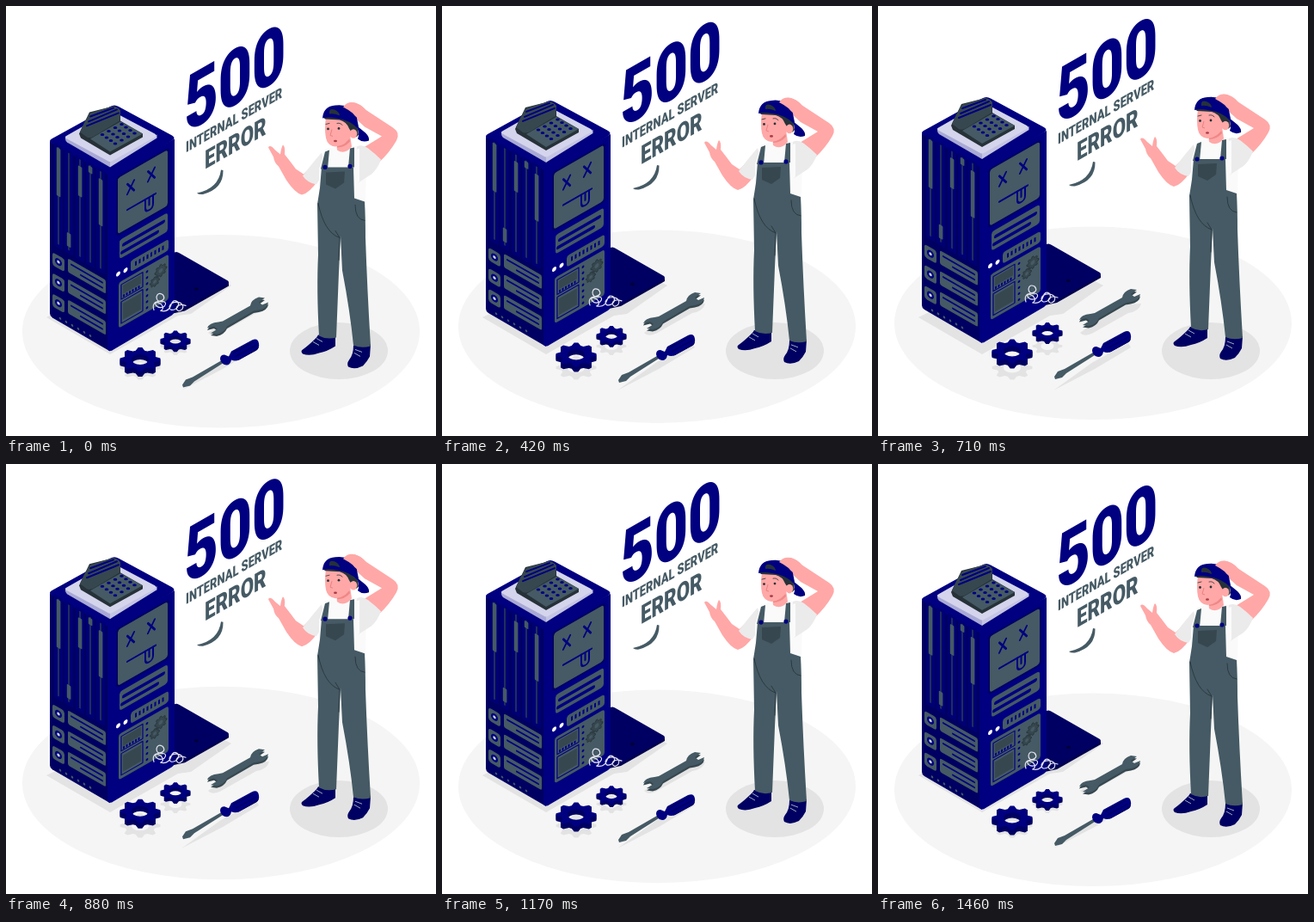
Write an HTML page that moves like this. It is 500 by 500 pixels and loops after 1500 ms.

```html
<!DOCTYPE html>
<html lang="en">
<head>
<meta charset="utf-8">
<title>500 Internal Server Error</title>
<style>
  html, body { margin: 0; width: 100%; height: 100%; overflow: hidden; background: #fff; }
  svg { display: block; width: 100vw; height: 100vh; }
  text { font-family: Roboto, sans-serif; font-weight: 900; }
  .navy { fill: #000080; }
  .deep { fill: #000062; }
  .slate { fill: #455a64; }
  .dark { fill: #37474f; }
  .skin { fill: #ffa8a7; }
  .shirt { fill: #fafafa; }
  .sleeve { fill: #ebebeb; }
  .shade { fill: #e3e3e3; }
  .ln { fill: none; stroke: #000080; stroke-linecap: round; stroke-linejoin: round; }
  .thin { fill: none; stroke: #263238; stroke-width: .8; stroke-linecap: round; }
</style>
</head>
<body>
<svg viewBox="0 0 500 500">
  <ellipse class="float" cx="250" cy="378.800" rx="231" ry="112.300" fill="#f5f5f5"/>

  <g class="shade">
    <ellipse cx="387" cy="401" rx="57" ry="33"/>
    <path d="M47 362L121 405L200 360L215 358L262 325L196 290Z"/>
    <path d="M204 447L252 422L294 397L291 392L250 414Z"/>
    <path d="M235 380Q240 386 252 379L291 357Q304 355 306 346L290 347L250 369Z"/>
    <g id="gearShade"></g>
  </g>

  <g class="float">
    <!-- loose side panel -->
    <path fill="#00004d" d="M194 287L259 323V326L208 355L194 358Z"/>
    <path class="deep" d="M194 288Q198 285 202 288L258 320Q260 322 258 324L208 352L194 356Z"/>
    <ellipse cx="221.500" cy="329.500" rx="2.600" ry="1.800" fill="#00003a"/>

    <!-- server case -->
    <path class="deep" d="M51 158L121 196V402L54 363Q51 361 51 358Z"/>
    <path class="navy" d="M121 195L196 155V355Q196 358 193 360L125 400Q121 403 118 400V195Z"/>
    <path class="navy" d="M53 155L121 117.500Q126 114.500 131 117.500L193 151Q198 154 193 157L125 196Q121 198 117 196L53 160Q49 157.500 53 155Z"/>
    <g id="left" transform="matrix(1 .573 0 1 51 156)"></g>
    <g id="front" transform="matrix(1 -.573 0 1 121 195)">
      <rect class="deep" x="7" y="9" width="62" height="69" rx="4"/>
      <rect class="slate" x="9" y="11" width="58" height="65" rx="3"/>
      <path class="ln" stroke-width="2.200" d="M20 24L28 36M28 24L20 36M44 23L52 35M52 23L44 35M20 54H53"/>
      <path class="ln" stroke-width="2" d="M41 54V64Q41 69 45.500 69T50 64V54M45.500 55V63"/>
      <rect class="slate" x="11" y="84" width="56" height="22" rx="3"/>
      <path class="ln" stroke-width="4" d="M16 92H62M14 100H55"/>
      <circle cx="9.500" cy="122.500" r="2.500" fill="#fff"/>
      <circle cx="18" cy="123" r="2.500" fill="#fff"/>
      <rect class="slate" x="24" y="115.500" width="44" height="13" rx="3"/>
      <path class="ln" stroke-width="5" stroke-dasharray="2 2.500" style="stroke-linecap:butt" d="M29 122H64"/>
      <rect class="slate" x="10" y="133" width="58" height="53" rx="3"/>
      <path class="ln" stroke-width="1.200" d="M13 137H38V154H13ZM13 157H38V182H13Z"/>
      <rect class="dark" x="15" y="139" width="21" height="10"/>
      <rect class="dark" x="15" y="160" width="21" height="19"/>
      <path class="ln" stroke-width="3" stroke-dasharray="2 1.500" style="stroke-linecap:butt" d="M15 151.500H36"/>
      <path class="ln" stroke-width="2.800" stroke-dasharray="0 7" d="M43 139V182"/>
      <g id="cogs"></g>
    </g>

    <!-- plate and keypad on top -->
    <path fill="#a9a9d6" d="M69 152L121 180V188L71 159Q69 157 69 155Z"/>
    <path fill="#c4c4e4" d="M121 180L175.500 150V154L124 186L121 188Z"/>
    <path fill="#d4d4ec" d="M71 151L122 122L173 149Q176 151 173 153L123 181Q121 182 119 181L71 155Q67 153 71 151Z"/>
    <path fill="#263238" d="M85 149L97 124L125 117L133 122V134L159 149V153L121 174L87 154Z"/>
    <path class="slate" d="M98 155L133 135L159 149L121 170Z"/>
    <path class="dark" d="M86 147Q92 133 98 125L124 117Q129 117 133 122L132 134L104 151Q98 155 94 153Z"/>
    <path class="ln" stroke-width="2" d="M98 129L125 119M96 135L129 121M94 140L131 125"/>
    <g id="keys" class="navy"></g>

    <!-- loose wires -->
    <g fill="none" stroke="#e4e4f2" stroke-width="1.200" stroke-linecap="round">
      <path d="M172 354Q169 345 178 344Q187 342 182 336Q176 333 175 339Q175 345 182 344Q188 345 184 350Q177 353 174 348Q173 343 180 347Q185 352 180 355"/>
      <path d="M180 355Q189 357 192 348Q194 341 199 344Q203 349 197 353Q190 356 190 350Q192 344 200 345Q208 347 205 353Q200 358 198 352Q200 346 209 349"/>
    </g>

    <g id="gears"></g>

    <!-- wrench -->
    <path class="dark" transform="translate(0 2.500)" d="M234 375Q236 369 247 368L252 367L284 349Q285 342 294 339L301 340L294 345L298 348L305 345Q304 352 294 354L288 355L257 373Q254 380 245 382L238 381L246 376L242 373Z"/>
    <path class="slate" d="M234 375Q236 369 247 368L252 367L284 349Q285 342 294 339L301 340L294 345L298 348L305 345Q304 352 294 354L288 355L257 373Q254 380 245 382L238 381L246 376L242 373Z"/>

    <!-- screwdriver -->
    <path class="slate" d="M205 441L209 435L217 432L250 413L252 416L219 437L214 442L206 444Z"/>
    <path class="navy" d="M249 411Q249 406 254 406L259 408L262 402L286 389Q293 386 294 393Q295 398 291 401L271 412Q266 414 262 412Q261 418 256 418Q250 417 249 411Z"/>
    <path class="deep" d="M268 413L294 397Q293 400 291 401L271 412Z"/>
    <path fill="none" stroke="#00005c" stroke-width="1.300" d="M264 404L288 391M267 408L291 395"/>

    <!-- message -->
    <g class="slate">
      <text class="navy" font-size="91" transform="matrix(.745 -.427 0 1 207.500 149)">500</text>
      <text font-size="17.300" transform="matrix(.745 -.427 0 1 209 171)">INTERNAL SERVER</text>
      <text font-size="30" transform="matrix(.745 -.427 0 1 231 190.500)">ERROR</text>
      <path d="M250 191Q247 213 222 218Q224 220 229 219.500Q253 213 252.500 191.500Z"/>
    </g>

    <!-- technician -->
    <g>
      <path class="deep" d="M345 400Q352 395 361 386L363 383H383L383 396Q374 402 364 404Q353 408 345 405Q342 402 345 400Z"/>
      <path class="deep" d="M399 412Q404 406 404 395L424 394L423 408Q420 414 415 419Q405 424 398 420Q396 416 399 412Z"/>
      <path fill="none" stroke="#b0bec5" stroke-width=".9" d="M357 391L364 395M361 387L368 391M405 404L412 408M406 400L414 403"/>
      <path class="skin" d="M305 165Q307 161 313 168L319 173Q320 165 322 162Q325 164 324 173L331 182Q334 186 337 190L346 196L352 190L363 203Q353 218 344 220Q336 218 326 203L317 187Q312 183 311 176Z"/>
      <path class="sleeve" d="M367 171Q358 181 345 198Q350 206 361 208L372 190Z"/>
      <path class="shirt" d="M371 167L384 164L402 163L412 164L419 170L418 234L364 228L364 190Z"/>
      <path class="skin" d="M411 168L437 152L417 141L404 129Q394 124 392 118Q398 112 405 113Q412 114 418 121L450 142Q459 148 454 157Q446 171 434 182L420 184Z"/>
      <path class="sleeve" d="M408 164Q414 161 421 166Q429 172 436 179Q432 190 425 196L408 207Z"/>
      <path class="shirt" d="M405 168L411 166V204L405 212Z"/>
      <path class="slate" d="M367 188H404L405 224L417 228Q418 245 418 270Q420 330 424 396Q413 399 404 395Q400 355 391 308L389 268L387 310L384 386Q373 389 364 384Q361 330 363 290L362 231L365 212Z"/>
      <path class="slate" d="M366 190L371 170L376 168L374 190ZM398 188L400 166L405 165L405 188Z"/>
      <path class="dark" d="M372 194L394 193L393 206L383 213L372 208Z"/>
      <path class="thin" d="M363 230Q370 264 388 270L387 296M417 250Q406 249 406 232M388 270L383 262"/>
      <circle class="navy" cx="371" cy="188" r="2.600"/>
      <circle class="navy" cx="400" cy="187" r="2.600"/>
      <path class="skin" d="M384 156L400 150L402 164Q394 174 385 168Z"/>
      <path fill="#ee8887" d="M385 162Q394 161 399 154L400 158Q394 165 385 165Z"/>
      <path class="skin" d="M372 130Q370 144 372 154Q374 163 383 164Q396 163 402 150L402 130Z"/>
      <path fill="#263238" d="M369 130Q374 126 384 128Q398 131 407 133L410 150Q407 155 404 151L399 143Q396 135 388 133L371 132Z"/>
      <ellipse class="skin" cx="404" cy="149" rx="4.300" ry="5.300"/>
      <path class="navy" d="M368 131Q369 117 383 116Q400 114 407 126L410 141L409 143Q400 133 384 131Q374 129 368 131Z"/>
      <path class="navy" d="M407 139Q413 144 418 148Q423 153 422 157Q415 160 409 155Q412 149 407 139Z"/>
      <path fill="#263238" d="M376 126Q375 119 382 121Q388 124 388 128Q381 125 376 126Z"/>
      <path class="skin" d="M392 118Q397 111 406 113Q414 116 419 122L417 134Q408 132 403 125Q398 121 392 118Z"/>
      <circle cx="374.500" cy="143.500" r="1.400" fill="#263238"/>
      <circle cx="387" cy="143" r="1.400" fill="#263238"/>
      <path class="thin" d="M372 138L376 137M385 137Q389 136 391 139"/>
      <path fill="none" stroke="#e98182" stroke-width="1" d="M379 144L377 151L380 152"/>
      <ellipse cx="383" cy="157.500" rx="2" ry="1.300" fill="#a93c48"/>
    </g>
  </g>
</svg>
<script>
const $ = id => document.getElementById(id);
const put = (id, markup) => $(id).insertAdjacentHTML('beforeend', markup);
const range = n => [...Array(n).keys()];

function toothed(cx, cy, r, squash, teeth) {
  const pts = range(teeth * 4).map(i => {
    const a = (i - 1.5) * Math.PI / teeth / 2;
    const d = i % 4 === 1 || i % 4 === 2 ? r : r * .76;
    return (cx + d * Math.cos(a)).toFixed(1) + ' ' + (cy + d * squash * Math.sin(a)).toFixed(1);
  });
  return 'M' + pts.join('L') + 'Z';
}
const hole = (cx, cy, r, squash) =>
  `M${cx - r} ${cy}a${r} ${r * squash} 0 1 0 ${2 * r} 0a${r} ${r * squash} 0 1 0 ${-2 * r} 0Z`;

// Floor gears: a dark stack for thickness, a lit face on top.
for (const [x, y, r, h] of [[156, 411.5, 23.5, 6], [197, 388.5, 17.5, 4]]) {
  const ring = dy => toothed(x, y + dy, r, .6, 8) + hole(x, y + dy, r * .43, .6);
  const face = (dy, cls) => `<path class="${cls}" fill-rule="evenodd" d="${ring(dy)}"/>`;
  put('gears', range(h).map(i => face(h - i, 'deep')).join('') + face(0, 'navy'));
  put('gearShade', `<path fill-rule="evenodd" d="${ring(h + 3)}"/>`);
}

for (const [x, y, r] of [[59, 147, 7], [52, 156, 5.5]]) {
  put('cogs', `<path class="dark" stroke="#263238" stroke-width=".7" d="${toothed(x, y, r, 1, 8)}"/>
    <circle class="slate" cx="${x}" cy="${y}" r="${r * .35}"/>`);
}

// Left face: [x, grey top, grey bottom] for each upright slot.
const slots = [[10, 4, 60], [22, 96, 112], [35, 11, 46], [47, 4, 12], [59, 12, 66]];
for (const [x, top, end] of slots) {
  put('left', `<rect x="${x - 5}" y="0" width="10" height="120" rx="2" fill="#000074"/>
    <rect x="${x - .8}" y="3" width="1.6" height="113" fill="#2a3a55"/>
    <rect class="slate" x="${x - 2.2}" y="${top}" width="4.6" height="${end - top}" rx="1"/>`);
}
for (const y of [128, 152, 176]) {
  put('left', `<rect class="slate" x="3" y="${y + 1}" width="14" height="15" rx="3"/>
    <circle class="navy" cx="10" cy="${y + 8.5}" r="4"/><circle cx="10" cy="${y + 8.5}" r="1.7" fill="#cfd8dc"/>
    <rect class="slate" x="21" y="${y - 2}" width="44" height="16" rx="2"/>
    <path class="ln" stroke-width="2" d="M25 ${y + 3}H61M36 ${y + 9}H61"/>`);
}
put('left', range(6).map(i => `<circle class="slate" cx="${12 + i * 7}" cy="201" r="1.3"/>`).join(''));

put('keys', range(16).map(i => {
  const c = i % 4, r = i >> 2;
  return `<ellipse cx="${112 + c * 7.5 + r * 5}" cy="${150 - c * 4 + r * 3.5}" rx="2.3" ry="1.5"/>`;
}).join(''));

// Linear bob of 10 px on a 24 fps clock, 36 steps per loop.
const floats = document.querySelectorAll('.float');
function draw(now) {
  const step = Math.floor(now * .024 + .1) % 36;
  const y = Math.abs(step - 17) * 10 / 18 - 10;
  for (const g of floats) g.setAttribute('transform', `translate(0 ${y.toFixed(3)})`);
}
const start = performance.now();
(function tick() {
  draw(performance.now() - start);
  requestAnimationFrame(tick);
})();
</script>
</body>
</html>
```
